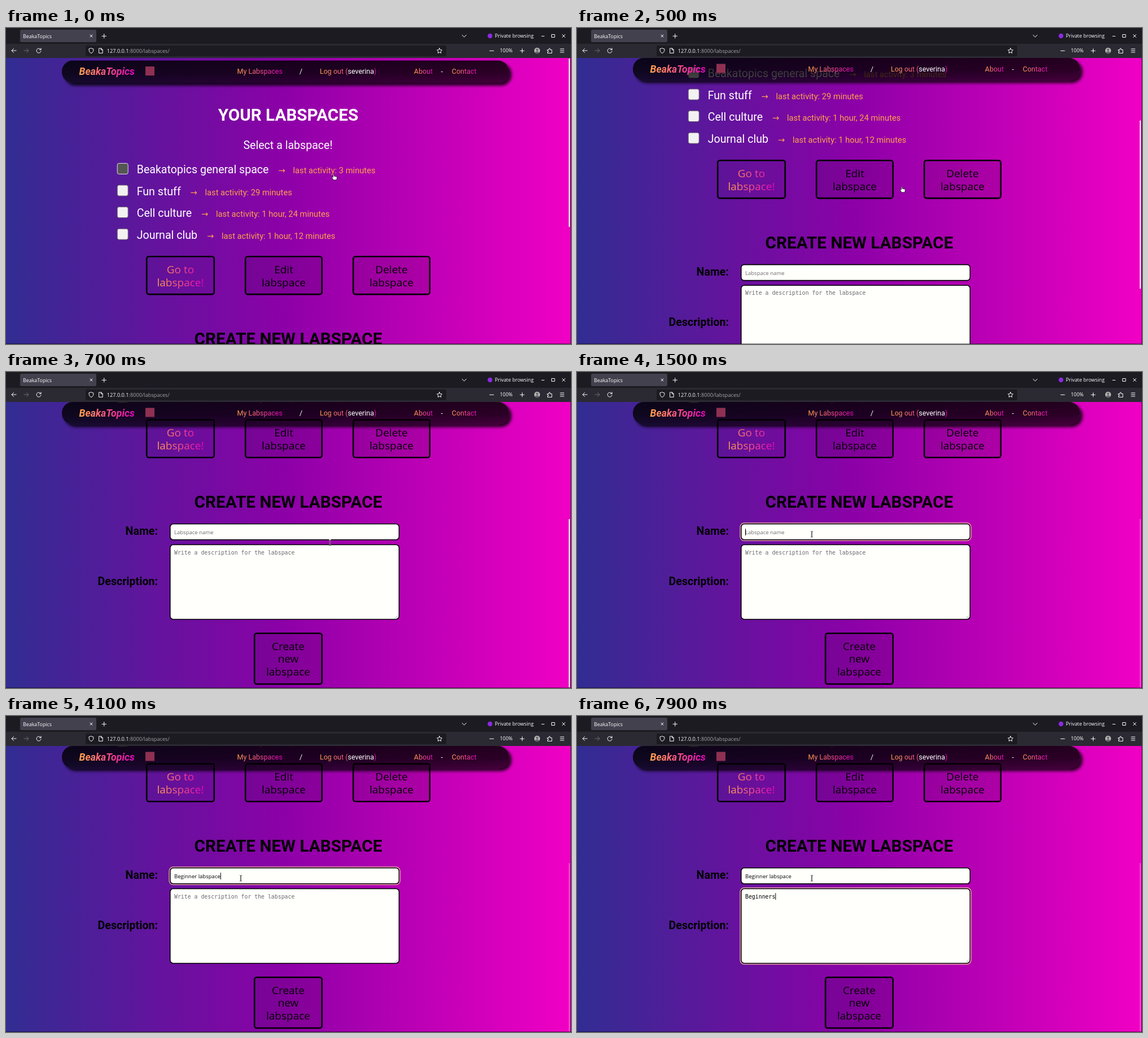
Recreate the animation shown at these times as an HTML page. Size 1001x559 px, loop 8000 ms.

```html
<!DOCTYPE html>
<html lang="en">
<head>
<meta charset="utf-8">
<title>BeakaTopics</title>
<style>
  html, body { margin: 0; width: 100%; height: 100%; overflow: hidden; background: #1c1b22; }
  svg { display: block; width: 1001px; height: 559px; }
  text { font-family: Roboto, sans-serif; white-space: pre; }
  .ui { font-family: "Open Sans", "Noto Sans", sans-serif; font-size: 8.9px; fill: #fbfbfe; }
  .icon { fill: none; stroke: #fbfbfe; stroke-width: 1; stroke-linecap: round; stroke-linejoin: round; }
  .nav { font-size: 12.5px; fill: url(#warm); }
  .title { font-size: 29.7px; font-weight: 700; text-anchor: middle; }
  .big { font-size: 19.6px; fill: #fff; }
  .label { font-size: 19.6px; font-weight: 700; text-anchor: end; }
  .note { font-size: 14.7px; fill: #ffa24b; }
  .arrow { font-family: "DejaVu Sans", sans-serif; }
  .button { font-family: "Open Sans", "Noto Sans", sans-serif; font-size: 19px; text-anchor: middle; }
  .frame { stroke: #000; stroke-width: 2.6; }
  .field { fill: #fffffc; stroke: #000; stroke-width: 1.6; }
  .ring { fill: none; stroke: #f8b9a6; stroke-width: 1.3; }
  .name { font-family: "Open Sans", "Noto Sans", sans-serif; font-size: 9.55px; }
  .desc { font-family: "DejaVu Sans Mono", monospace; font-size: 9.85px; }
</style>
</head>
<body>
<svg id="stage" viewBox="0 0 1001 559" xmlns="http://www.w3.org/2000/svg">
  <defs>
    <linearGradient id="page">
      <stop offset="0" stop-color="#312d92"/>
      <stop offset=".28" stop-color="#66129e"/>
      <stop offset=".5" stop-color="#8e00a8"/>
      <stop offset="1" stop-color="#f100c4"/>
    </linearGradient>
    <linearGradient id="warm">
      <stop offset="0" stop-color="#ffa24b"/>
      <stop offset="1" stop-color="#e400bd"/>
    </linearGradient>
    <linearGradient id="shade" x2="0" y2="1">
      <stop offset="0" stop-opacity=".84"/>
      <stop offset=".55" stop-opacity=".8"/>
      <stop offset="1" stop-opacity=".7"/>
    </linearGradient>
    <filter id="blur" x="-5%" y="-50%" width="110%" height="200%"><feGaussianBlur stdDeviation="2.4"/></filter>
    <mask id="outside" maskUnits="userSpaceOnUse" x="0" y="0" width="1001" height="200">
      <rect width="1001" height="200" fill="#fff"/>
      <rect x="99" y="53" width="792" height="39.5" rx="19"/>
    </mask>
    <clipPath id="view"><rect y="53" width="1001" height="506"/></clipPath>
  </defs>

  <rect y="53" width="1001" height="506" fill="url(#page)"/>
  <g clip-path="url(#view)">
    <g id="content">
      <text class="title" x="500" y="164" fill="#fff">YOUR LABSPACES</text>
      <text class="big" x="499.5" y="214" text-anchor="middle">Select a labspace!</text>
      <g id="rows"></g>
      <g id="buttons"></g>
      <text class="title" x="500" y="560">CREATE NEW LABSPACE</text>
      <text class="label" x="269" y="608">Name:</text>
      <text class="label" x="269" y="696.5">Description:</text>
      <rect class="field" x="290.8" y="588.6" width="405.6" height="28" rx="5.5"/>
      <rect class="field" x="290.8" y="625.3" width="405.6" height="132" rx="5.5"/>
      <path d="M689.5 755.5l5-5M692.5 755.5l2-2" stroke="#888" stroke-width=".8"/>
      <rect class="ring" id="nameRing" x="289.2" y="587" width="408.8" height="31.2" rx="7"/>
      <rect class="ring" id="descRing" x="289.2" y="623.7" width="408.8" height="135.2" rx="7"/>
      <text class="name" id="nameText" x="298" y="606.5"></text>
      <text class="desc" id="descText" x="298" y="642.4"></text>
      <rect id="caret" width="1" height="12"/>
    </g>

    <g id="nav">
      <rect x="104" y="58" width="792" height="39.5" rx="19" filter="url(#blur)" mask="url(#outside)" opacity=".8"/>
      <rect x="99" y="53" width="792" height="39.5" rx="19" fill="url(#shade)"/>
      <text x="129.5" y="78.5" font-size="17.7" font-weight="700" font-style="italic" fill="url(#warm)">BeakaTopics</text>
      <rect x="247" y="63.5" width="16" height="16" fill="#8f3052"/>
      <text class="nav" x="409.5" y="76.5">My Labspaces</text>
      <text class="nav" x="520" y="76.5" style="fill:#fff">/</text>
      <text class="nav" x="556" y="76.5">Log out (<tspan fill="#fff">severina</tspan>)</text>
      <text class="nav" x="722.8" y="76.5">About</text>
      <text class="nav" x="770.5" y="76.5" style="fill:#fff">-</text>
      <text class="nav" x="789.8" y="76.5">Contact</text>
    </g>
    <rect id="thumb" x="997" width="2" height="298" rx="1" fill="#fff"/>
  </g>
  <path d="M0 558.5H1000.5V53" fill="none" stroke="#000" stroke-opacity=".5"/>

  <g id="browser">
    <rect width="1001" height="28" fill="#1c1b22"/>
    <rect y="28" width="1001" height="25" fill="#2b2a33"/>
    <rect x="25" y="3" width="135" height="22" rx="2.5" fill="#42414d"/>
    <rect x="141" y="31" width="639" height="19" rx="2.5" fill="#1c1b22"/>
    <text class="ui" x="30" y="17.5">BeakaTopics</text>
    <text class="ui" x="866" y="17.3">Private browsing</text>
    <text class="ui" x="875" y="43.3">100%</text>
    <text class="ui" x="178.7" y="43.6" style="font-size:9.2px">127.0.0.1<tspan fill="#a3a2aa">:8000/labspaces/</tspan></text>
    <circle cx="857.5" cy="14" r="4.2" fill="#8a2be0"/>
    <circle cx="941" cy="40" r="5.2" fill="#b9b3ae"/>
    <path d="M937 43.4q4-5 8 0a5.2 5.2 0 0 1-8 0" fill="#5d6570"/>
    <circle cx="941" cy="38.5" r="2" fill="#5d6570"/>
    <g class="icon">
      <path d="M149 12l4 4m0-4l-4 4M170 14.3h7.5m-3.75-3.75v7.5M808 12.5l3.7 3.5 3.7-3.5M949 14.5h4.5M967 11.5h5v5h-5zM985.5 11.5l5 5m0-5l-5 5"/>
      <path d="M18 40h-8m3.5-3.5L10 40l3.5 3.5"/>
      <path d="M32 40h8m-3.5-3.5L40 40l-3.5 3.5" stroke="#6d6c75"/>
      <path d="M61.5 38a4 4 0 1 0 .5 3M62 35.8v2.8h-2.8"/>
      <path d="M151 35.8l4 1.4q.3 5.5-4 7.5-4.3-2-4-7.5z"/>
      <path d="M165 36h3.8l2.4 2.4v6h-6.2zM168.5 36v2.7h2.7"/>
      <path d="M768 35.7l1.35 2.9 3.15.4-2.3 2.2.6 3.2-2.8-1.55-2.8 1.55.6-3.2-2.3-2.2 3.15-.4z"/>
      <path d="M857 40.3h7M911 40.3h7m-3.5-3.5v7M982 37h6.5M982 40h6.5M982 43h6.5"/>
      <path d="M959.5 38.5h2.3q-.4-2.5 1.2-2.5t1.2 2.5h2.8v6h-7.5v-2.3q2 .2 2-.9t-2-.9z"/>
    </g>
  </g>

  <g id="tooltip">
    <rect x="416.5" y="299.5" width="112" height="28" rx="3" fill="#2b2a33" stroke="#5b5a66"/>
    <text class="ui" x="425" y="316.7">Please fill out this field.</text>
  </g>
  <path id="hand" d="M-2.4-5.5q1.2-.8 1.6.6V-2l4 .8q1.3.4 1.2 1.7L3.8 4.8h-5.6L-4.6.6q-.4-1.3 1-1.1l1 .9z" fill="#fff" stroke="#111" stroke-width=".8"/>
  <g id="beam" fill="none">
    <path d="M-2-5.2q2 0 2 1.2v8q0 1.2-2 1.2M2-5.2q-2 0-2 1.2v8q0 1.2 2 1.2" stroke="#fff" stroke-width="2"/>
    <path d="M-2-5.2q2 0 2 1.2v8q0 1.2-2 1.2M2-5.2q-2 0-2 1.2v8q0 1.2 2 1.2" stroke="#333" stroke-width=".9"/>
  </g>
</svg>
<script>
const LOOP = 8000, STEP = 100;
const $ = id => document.getElementById(id);
const show = (id, on) => $(id).setAttribute("visibility", on ? "visible" : "hidden");
const set = (node, attrs) => { for (const k in attrs) node.setAttribute(k, attrs[k]); return node; };
function add(parent, tag, attrs, text = "") {
  const node = set(document.createElementNS("http://www.w3.org/2000/svg", tag), attrs);
  node.textContent = text;
  return parent.appendChild(node);
}

// name, arrow x, last activity
const spaces = [
  ["Beakatopics general space", 482.5, "3 minutes"],
  ["Fun stuff", 326.5, "29 minutes"],
  ["Cell culture", 346, "1 hour, 24 minutes"],
  ["Journal club", 356, "1 hour, 12 minutes"]
];
const rows = spaces.map(([name, x, age], i) => {
  const y = 257 + i * 38.6, g = $("rows");
  const box = add(g, "rect", { x: 197.2, y: y - 17.6, width: 19, height: 19, rx: 3, fill: "#f3f1f2", stroke: "#69606c" });
  const label = add(g, "text", { x: 231.7, y, class: "big" }, name);
  add(g, "text", { x, y, class: "note arrow" }, "→");
  add(g, "text", { x: x + 26, y, class: "note" }, "last activity: " + age);
  return { box, label };
});

function addButton(x, y, width, lines, fill = "#000", tint = .09) {
  const g = $("buttons"), height = 23 * lines.length + 20.8;
  add(g, "rect", { x, y, width, height, rx: 4, class: "frame", "fill-opacity": tint });
  const text = add(g, "text", { class: "button", fill });
  lines.forEach((line, i) => add(text, "tspan", { x: x + width / 2, y: y + 29.5 + i * 22.7 }, line));
}
addButton(249.2, 404.3, 119.6, ["Go to", "labspace!"], "url(#warm)", .03);
addButton(424.2, 404.3, 135.6, ["Edit", "labspace"]);
addButton(615.2, 404.3, 135.6, ["Delete", "labspace"]);
addButton(440.2, 782, 119.6, ["Create", "new", "labspace"]);

// Keyed steps are [time, value...]; the latest one at or before t holds.
const held = (keys, t) => keys.reduce((now, key) => key[0] <= t ? key : now);

const scrollKeys = [[0, 0], [200, 5], [300, 20], [400, 58.3], [500, 170], [600, 278], [700, 319.8]];
const beamKeys = [[600, 574, 285], [700, 574, 302], [900, 466, 341], [1100, 436, 309], [1200, 416, 287]];
const nameKeys = [[0, 0], [2200, 2], [2400, 3], [2500, 4], [2600, 5], [2700, 6], [2800, 7], [2900, 8],
  [3000, 10], [3100, 11], [3300, 12], [3500, 13], [3600, 14], [3900, 15], [4100, 17]];
const descKeys = [[0, 0], [5100, 1], [5900, 0], [6400, 1], [6700, 2], [6800, 3], [6900, 5],
  [7100, 7], [7500, 8], [7900, 9]];

// Shows typed text or the placeholder, and returns the caret's x.
function type(id, full, count, placeholder) {
  const node = $(id);
  node.textContent = count ? full.slice(0, count) : placeholder;
  node.setAttribute("fill", count ? "#000" : "#6c6a6c");
  return 298 + (count ? node.getComputedTextLength() : 0);
}

function draw(t) {
  const scroll = held(scrollKeys, t)[1];
  set($("content"), { transform: `translate(0 ${-scroll})` });
  set($("nav"), { transform: `translate(0 ${Math.max(0, 4.6 - scroll)})` });
  set($("thumb"), { y: 54 + scroll * .644, opacity: t < 1300 ? 1 : .3 });

  const gray = Math.round(Math.min(242, 85 + t * .325));
  set(rows[0].box, { fill: `rgb(${gray},${gray},${gray})`, stroke: t < 300 ? "#e8e0ea" : "#69606c" });
  rows[3].label.style.fill = t >= 400 && t < 500 ? "#160018" : "#fff";

  const glide = Math.min(1, t / 400);
  const [, x, y] = held(beamKeys, t);
  set($("hand"), { transform: `translate(${582 - 5 * glide} ${264 + 22 * glide})` });
  set($("beam"), { transform: `translate(${x} ${y})` });
  show("hand", t < 600);
  show("beam", t >= 600);
  show("tooltip", t >= 2000 && t < 2200);

  const inName = t >= 1300 && t < 4500, inDesc = t >= 4500;
  const nameEnd = type("nameText", "Beginner labspace", held(nameKeys, t)[1], "Labspace name");
  const descEnd = type("descText", "Beginners", held(descKeys, t)[1], "Write a description for the labspace");
  show("nameRing", inName);
  show("descRing", inDesc);
  show("caret", (inName || inDesc) && !(t >= 5600 && t < 5900));
  set($("caret"), { x: inDesc ? descEnd : nameEnd, y: inDesc ? 633 : 597 });
}

const start = performance.now();
function tick() {
  const t = (performance.now() - start) % LOOP;
  draw(Math.floor(t / STEP) * STEP);
  requestAnimationFrame(tick);
}
tick();
</script>
</body>
</html>
```
